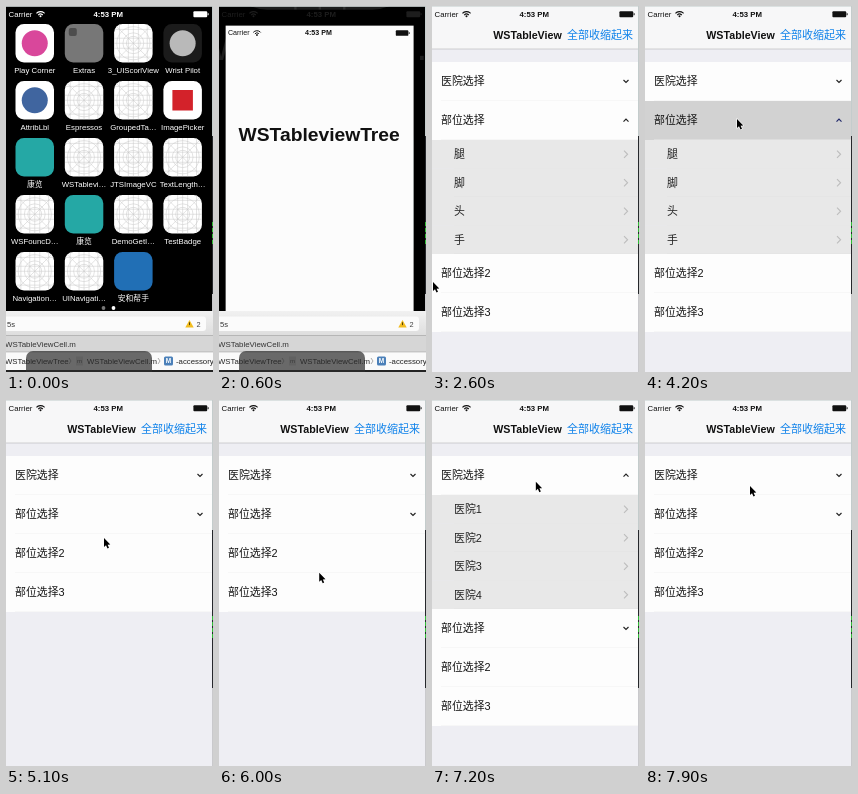
An HTML page with a canvas for the animation above (8000 ms loop, 207 px wide and 366 px high).

```html
<!DOCTYPE html>
<html lang="zh-CN">
<head>
<meta charset="utf-8">
<title>Expandable table</title>
<style>
html, body { margin: 0; width: 100%; height: 100%; overflow: hidden; background: #000; }
canvas { display: block; width: 207px; height: 366px; }
</style>
</head>
<body>
<canvas id="stage"></canvas>
<script>
const W = 207, H = 366, LOOP = 8000;
const FONT = '"Liberation Sans", "Noto Sans CJK SC", "Noto Sans CJK", sans-serif';
const canvas = document.getElementById('stage');
const dpr = window.devicePixelRatio || 1;
canvas.width = W * dpr;
canvas.height = H * dpr;
const ctx = canvas.getContext('2d');

const clamp = v => Math.max(0, Math.min(1, v));
const ramp = (t, a, b) => clamp((t - a) / (b - a));
const smooth = p => p * p * (3 - 2 * p);
const mix = (a, b, p) => a + (b - a) * p;

function rect(x, y, w, h, color) {
  ctx.fillStyle = color;
  ctx.fillRect(x, y, w, h);
}

function round(x, y, w, h, r, color) {
  ctx.beginPath();
  ctx.roundRect(x, y, w, h, r);
  ctx.fillStyle = color;
  ctx.fill();
}

function disc(x, y, r, color) {
  ctx.beginPath();
  ctx.arc(x, y, r, 0, Math.PI * 2);
  ctx.fillStyle = color;
  ctx.fill();
}

function line(points, color, width) {
  ctx.beginPath();
  points.forEach(([x, y]) => ctx.lineTo(x, y));
  ctx.strokeStyle = color;
  ctx.lineWidth = width;
  ctx.stroke();
}

function text(s, x, y, size, color, align = 'left', weight = '') {
  ctx.font = `${weight} ${size}px ${FONT}`;
  ctx.fillStyle = color;
  ctx.textAlign = align;
  ctx.textBaseline = 'alphabetic';
  ctx.fillText(s, x, y + size * 0.36);
}

function statusBar(color) {
  text('Carrier', 2.5, 8, 7.8, color);
  ctx.strokeStyle = color;
  ctx.lineWidth = 1.1;
  for (const r of [3, 5.4]) {
    ctx.beginPath();
    ctx.arc(34.5, 11, r, -Math.PI * 0.77, -Math.PI * 0.23);
    ctx.stroke();
  }
  disc(34.5, 10.3, 1, color);
  text('4:53 PM', 102.2, 8, 7.8, color, 'center', 'bold');
  round(187.4, 5.2, 13.8, 6, 1, color);
  rect(201.6, 7.2, 1, 2, color);
}

// Home screen

const TILE = 38.5;

function blankTile(x, y) {
  round(x, y, TILE, TILE, 8.5, '#fff');
  ctx.save();
  ctx.clip();
  const c = TILE / 2, gray = '#c6c6c6';
  for (const k of [0.14, 0.37, 0.5, 0.63, 0.86]) {
    line([[x + k * TILE, y], [x + k * TILE, y + TILE]], gray, 0.5);
    line([[x, y + k * TILE], [x + TILE, y + k * TILE]], gray, 0.5);
  }
  line([[x, y], [x + TILE, y + TILE]], gray, 0.5);
  line([[x + TILE, y], [x, y + TILE]], gray, 0.5);
  for (const r of [0.18, 0.27, 0.43]) {
    ctx.beginPath();
    ctx.arc(x + c, y + c, r * TILE, 0, Math.PI * 2);
    ctx.stroke();
  }
  ctx.restore();
}

// label, tile color, mark color, mark shape
const APPS = [
  ['Play Corner', '#fff', '#d9479b', 'disc'], ['Extras', '#777', '#4d4d4d', 'mini'],
  ['3_UIScorlView'], ['Wrist Pilot', '#1b1b1b', '#b9b9b9', 'disc'],
  ['AttribLbl', '#fff', '#40659f', 'disc'], ['Espressos'], ['GroupedTa…'],
  ['ImagePicker', '#fff', '#d3222a', 'square'],
  ['康览', '#25a8a5'], ['WSTablevi…'], ['JTSImageVC'], ['TextLength…'],
  ['WSFouncD…'], ['康览', '#25a8a5'], ['DemoGetI…'], ['TestBadge'],
  ['Navigation…'], ['UINavigati…'], ['安和帮手', '#216fb5']
];

function home() {
  APPS.forEach(([label, tile, mark, shape], i) => {
    const x = 9.5 + (i % 4) * 49.3, y = 18 + Math.floor(i / 4) * 57;
    const c = TILE / 2;
    if (tile) round(x, y, TILE, TILE, 8.5, tile);
    else blankTile(x, y);
    if (shape === 'disc') disc(x + c, y + c, 13, mark);
    if (shape === 'square') rect(x + 9, y + 9, 20.5, 20.5, mark);
    if (shape === 'mini') round(x + 4, y + 4, 8, 8, 2, mark);
    text(label, x + c, y + 46, 7.8, '#fff', 'center');
  });
  disc(97.5, 302, 1.9, '#777');
  disc(107.5, 302, 1.9, '#fff');
}

function launch() {
  rect(0, 0, W, 368, '#fcfcfc');
  statusBar('#111');
  text('WSTableviewTree', 103, 119, 21.2, '#111', 'center', 'bold');
}

// The launch screen grows out of an icon, and the home screen zooms with it.
function opening(t) {
  const p = 1 - Math.pow(1 - ramp(t, 50, 880), 2);
  const icon = { x: 78, y: 208 }, s0 = TILE / W;
  const s = mix(s0, 1, p);
  const x = mix(icon.x, 103.5, p), y = mix(icon.y, 184, p);

  rect(0, 0, W, H, '#000');
  ctx.save();
  ctx.globalAlpha = 1 - p;
  ctx.translate(x, y);
  ctx.scale(s / s0, s / s0);
  ctx.translate(-icon.x, -icon.y);
  home();
  ctx.restore();

  ctx.globalAlpha = 1 - p;
  statusBar('#fff');
  ctx.globalAlpha = 1;
  if (p === 0) return;
  ctx.save();
  ctx.globalAlpha = clamp(p * 3);
  ctx.translate(x - s * W / 2, y - s * 184);
  ctx.scale(s, s);
  launch();
  ctx.restore();
}

// Editor window below the phone

function arrow(x, y) {
  line([[x, y - 3], [x + 2, y], [x, y + 3]], '#888', 0.7);
}

function editor() {
  const bar = ctx.createLinearGradient(0, 305, 0, 329);
  bar.addColorStop(0, '#f1f1f1');
  bar.addColorStop(1, '#dedede');
  rect(0, 305, W, 24, bar);
  round(-8, 310.5, 208, 14.5, 3, '#fbfbfb');
  text('5s', 1, 318, 7.6, '#333');
  ctx.beginPath();
  ctx.moveTo(183.5, 314);
  ctx.lineTo(187.7, 321.5);
  ctx.lineTo(179.3, 321.5);
  ctx.fillStyle = '#f2bd20';
  ctx.fill();
  rect(183.1, 316.3, 0.9, 2.8, '#443300');
  text('2', 190.5, 318, 7.4, '#444');
  rect(0, 329, W, 17, '#d6d6d6');
  rect(0, 329, W, 0.7, '#aaa');
  text('WSTableViewCell.m', -1, 338, 7.9, '#333');
  rect(0, 346, W, 18, '#fafafa');
  rect(0, 345.6, W, 0.7, '#aaa');
  text('WSTableViewTree', -1, 355, 7.8, '#222');
  arrow(63, 355);
  rect(70, 350.5, 7, 9, '#dedede');
  text('m', 73.5, 355, 6, '#555', 'center');
  text('WSTableViewCell.m', 81, 355, 7.8, '#222');
  arrow(152, 355);
  round(158, 350.5, 9, 9, 1.5, '#4b80b9');
  text('M', 162.5, 355, 6.5, '#fff', 'center', 'bold');
  text('-accessory', 170, 355, 7.8, '#222');
  rect(0, 364, W, 2, '#222');
  round(20, 345, 126, 32, 7, 'rgba(45,45,45,0.7)');
}

// Table screen

const ROW = 39, SUB = 28.5;

function chevron(y, p, color) {
  ctx.save();
  ctx.translate(194, y);
  ctx.rotate(Math.PI * p);
  line([[-2.5, -1.3], [0, 1.2], [2.5, -1.3]], color, 1.15);
  ctx.restore();
}

function mainRow(label, y, press, open) {
  const g = Math.round(mix(253, 210, press));
  rect(0, y, 206, ROW, `rgb(${g},${g},${g})`);
  rect(9, y + ROW - 0.4, 197, 0.4, '#ececec');
  text(label, 9, y + 19.3, 10.9, '#151515');
  if (open !== undefined) chevron(y + 19.3, open, press > 0.9 ? '#20286a' : '#222');
}

// Rows fan out from behind the one above, each covering the one before.
// Returns the vertical space they take.
function subRows(labels, y, p) {
  if (p <= 0) return 0;
  const space = labels.length * SUB * p;
  const lift = 10 * (1 - p);
  ctx.save();
  ctx.beginPath();
  ctx.rect(0, y, 206, Math.max(0, space - lift));
  ctx.clip();
  labels.forEach((label, i) => {
    const top = y + i * SUB * p - lift, mid = top + SUB / 2;
    rect(0, top, 206, SUB, '#e8e8e8');
    text(label, 22, mid, 10.9, '#222');
    line([[192, mid - 3.6], [195.6, mid], [192, mid + 3.6]], '#bdbdbd', 1.1);
    rect(22, top + SUB - 0.4, 184, 0.4, '#e1e1e1');
  });
  ctx.restore();
  return space;
}

function table(t) {
  const parts = 1 - smooth(ramp(t, 4400, 4750));
  const hospitals = smooth(ramp(t, 6550, 6914)) * (1 - smooth(ramp(t, 7400, 7700)));
  const turn = p => Math.pow(p, 0.3);
  const pressParts = ramp(t, 4080, 4130) * (1 - ramp(t, 4450, 4800));
  const pressHospitals = Math.max(
    ramp(t, 6420, 6470) * (1 - 0.2 * ramp(t, 6550, 6700)) * (1 - ramp(t, 6750, 7000)),
    ramp(t, 7270, 7320) * (1 - ramp(t, 7500, 7780)));

  rect(0, 0, W, 368, '#eeeef3');
  rect(0, 0, W, 43, '#f7f7f8');
  rect(0, 42.7, W, 0.6, '#b4b4b6');
  statusBar('#111');
  text('WSTableView', 95.5, 29, 10.7, '#111', 'center', 'bold');
  text('全部收缩起来', 135, 29, 11, '#0f82ea');

  let y = 56;
  mainRow('医院选择', y, pressHospitals, turn(hospitals));
  y += ROW;
  y += subRows(['医院1', '医院2', '医院3', '医院4'], y, hospitals);
  mainRow('部位选择', y, pressParts, turn(parts));
  y += ROW;
  y += subRows(['腿', '脚', '头', '手'], y, parts);
  mainRow('部位选择2', y, 0);
  mainRow('部位选择3', y + ROW, 0);
}

// Slivers of the windows behind the phone
function edge() {
  rect(0, 0, W, 0.8, '#d5dcdc');
  rect(206, 0, 1, 130, '#c4cccc');
  rect(206, 130, 1, 158, '#26282c');
  for (let y = 216; y < 238; y += 6) rect(206, y, 1, 4, '#2fbd35');
  rect(206, 288, 1, 78, '#c9c9cc');
}

// time, x, y
const PATH = [
  [2350, -8, 268], [2600, 1, 276], [2950, 7, 272], [3850, 92, 113], [4500, 92, 113],
  [5100, 98, 138], [5700, 100, 184], [5900, 100, 184], [6400, 102, 78],
  [7000, 102, 78], [7350, 105, 84], [7800, 105, 86], [8000, 105, 86]
];

function cursor(t) {
  const i = PATH.findIndex(k => k[0] > t);
  if (i < 1) return;
  const [t0, x0, y0] = PATH[i - 1], [t1, x1, y1] = PATH[i];
  const p = smooth(ramp(t, t0, t1));
  ctx.save();
  ctx.translate(mix(x0, x1, p), mix(y0, y1, p));
  ctx.beginPath();
  for (const [x, y] of [[0, 0], [0, 9], [2, 7.2], [3.5, 10.5], [5, 9.8], [3.6, 6.7], [6.3, 6.6]]) {
    ctx.lineTo(x, y);
  }
  ctx.closePath();
  ctx.lineJoin = 'round';
  ctx.strokeStyle = '#fff';
  ctx.lineWidth = 1.2;
  ctx.stroke();
  ctx.fillStyle = '#000';
  ctx.fill();
  ctx.restore();
}

function draw(t) {
  ctx.setTransform(dpr, 0, 0, dpr, 0, 0);
  ctx.globalAlpha = 1;
  if (t < 1500) opening(t);
  if (t >= 1200) {
    ctx.globalAlpha = ramp(t, 1150, 1500);
    table(t);
    ctx.globalAlpha = 1;
  }
  edge();
  if (t < 1300) editor();
  cursor(t);
}

const start = performance.now();
function tick() {
  draw((performance.now() - start) % LOOP);
  requestAnimationFrame(tick);
}
tick();
</script>
</body>
</html>
```
